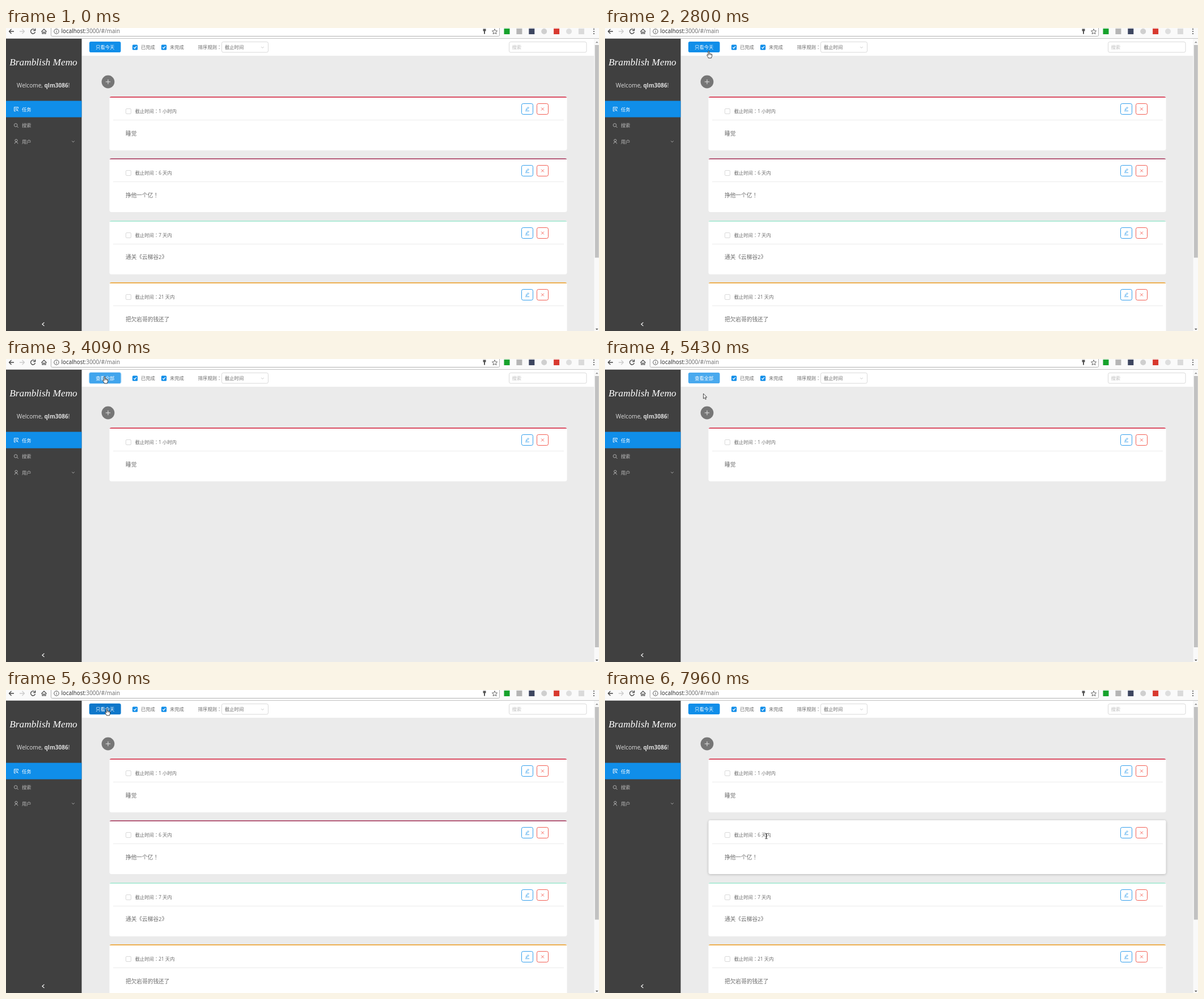
An HTML page with a canvas that plays this animation: 1046 px wide and 535 px high, repeating every 8000 ms.

```html
<!DOCTYPE html>
<html lang="zh-CN">
<head>
<meta charset="utf-8">
<title>Todo</title>
<style>
html, body { margin: 0; width: 100%; height: 100%; overflow: hidden; background: #ebebeb; }
canvas { display: block; width: 1046px; height: 535px; }
</style>
</head>
<body>
<canvas id="stage" width="1046" height="535"></canvas>
<script>
const ctx = document.getElementById('stage').getContext('2d');
const LOOP = 8000, TICK = 90, TAU = Math.PI * 2;
const FONT = '"Open Sans", "Noto Sans CJK SC", "Noto Sans CJK", sans-serif';
const MARKS = '"Noto Sans CJK TC", "Noto Sans CJK SC", sans-serif';
const BLUE = '#108ee9', RED = '#f04134', LINE = '#d9d9d9', INK = '#6a6a6a';
const FIRST = 121.5, PITCH = 109.4, HEIGHT = 95;

// The two clicks: the first shows only today, the second shows everything
const CLICKS = [{ down: 3720, up: 3960 }, { down: 6100, up: 6390 }];
const BLUR = 6750;

// Turning points of the pointer
const PATH = [
  { t: 0, x: 700, y: 600 },
  { t: 560, x: 440, y: 200 },
  { t: 980, x: 335, y: 115 },
  { t: 1500, x: 200, y: 48 },
  { t: 1780, x: 168, y: 72 },
  { t: 2790, x: 183, y: 41 },
  { t: 3080, x: 222, y: 138 },
  { t: 3420, x: 205, y: 138 },
  { t: 3680, x: 174, y: 31 },
  { t: 4320, x: 174, y: 31 },
  { t: 4920, x: 173, y: 55 },
  { t: 5400, x: 173.5, y: 61 },
  { t: 5640, x: 181, y: 93 },
  { t: 5840, x: 178, y: 33 },
  { t: 6390, x: 178, y: 33 },
  { t: 6640, x: 220, y: 133 },
  { t: 7240, x: 304, y: 142 },
  { t: 7500, x: 252, y: 244 },
  { t: 7900, x: 284.5, y: 258 }
];

const CARDS = [
  { due: '1 小时内', text: '睡觉', rgb: [217, 77, 99] },
  { due: '6 天内', text: '挣他一个亿！', rgb: [181, 93, 122] },
  { due: '7 天内', text: '通关《云梯谷2》', rgb: [176, 234, 214] },
  { due: '21 天内', text: '把欠岩哥的钱还了', rgb: [237, 176, 82] }
];

function pointerAt(t) {
  const k = PATH.findIndex(p => p.t > t);
  if (k < 1) return k ? PATH[PATH.length - 1] : PATH[0];
  const a = PATH[k - 1], b = PATH[k], f = Math.max(0, (t - a.t) / (b.t - a.t));
  return { x: a.x + (b.x - a.x) * f, y: a.y + (b.y - a.y) * f };
}

// Delayed transition: share of a 300 ms window in which test held
function fade(test, t) {
  const n = 15;
  let sum = 0;
  for (let k = 0; k < n; k++) sum += test(t - 450 + 300 * (k + .5) / n) ? 1 : 0;
  return sum / n;
}

const overPlus = p => Math.hypot(p.x - 180, p.y - 95) < 11.5;
const overButton = p => p.x > 147 && p.x < 202.5 && p.y > 24 && p.y < 43.5;
const overCard = (p, i) => p.x > 182 && p.x < 990 &&
  p.y > FIRST + i * PITCH && p.y < FIRST + i * PITCH + HEIGHT;
const overText = p => p.x > 228 && p.x < 293 &&
  CARDS.some((c, i) => Math.abs(p.y - FIRST - 25.2 - i * PITCH) < 5);

const mix = (a, b, k) => `rgb(${a.map((v, i) => Math.round(v + (b[i] - v) * k))})`;

function rect(x, y, w, h, color) {
  ctx.fillStyle = color;
  ctx.fillRect(x, y, w, h);
}

function paint(fill, stroke, width) {
  if (fill) { ctx.fillStyle = fill; ctx.fill(); }
  if (stroke) { ctx.strokeStyle = stroke; ctx.lineWidth = width; ctx.stroke(); }
}

function box(x, y, w, h, r, fill, stroke, width = 1) {
  ctx.beginPath();
  ctx.roundRect(x, y, w, h, r);
  paint(fill, stroke, width);
}

function disc(x, y, r, fill, stroke, width = 1) {
  ctx.beginPath();
  ctx.arc(x, y, r, 0, TAU);
  paint(fill, stroke, width);
}

// SVG-style path placed at x, y
function shape(d, x, y, stroke, width = 1, fill) {
  const p = new Path2D(d);
  ctx.save();
  ctx.translate(x, y);
  ctx.lineJoin = 'round';
  if (fill) { ctx.fillStyle = fill; ctx.fill(p); }
  if (stroke) { ctx.strokeStyle = stroke; ctx.lineWidth = width; ctx.stroke(p); }
  ctx.restore();
}

// Text centred vertically on cy, wide punctuation centred in its cell; returns the right edge
function label(s, x, cy, size, color, style = '', family = FONT) {
  ctx.fillStyle = color;
  for (const part of s.split(/([：！])/)) {
    ctx.font = `${style} ${size}px ${/[：！]/.test(part) ? MARKS : family}`;
    ctx.fillText(part, x, cy + size * .37);
    x += ctx.measureText(part).width;
  }
  return x;
}

const chevron = (x, y, color) => shape('M-2.2-1.1L0 1.1L2.2-1.1', x, y, color, .9);

function browserBar() {
  rect(0, 0, 1046, 19, '#fafafa');
  box(79.5, -6, 791, 20.5, 2, '#fff', '#b4b4b4');
  rect(0, 18, 1046, 1, '#c4c4c4');
  shape('M4.5 0H-4M0-4L-4 0L0 4', 9.5, 6, '#444', 1.3);
  shape('M-4.5 0H4M0-4L4 0L0 4', 28.5, 6, '#ccc', 1.3);
  shape('M3.2-2.6A4 4 0 1 0 4 1M4.2-5V-1.4H.6', 47.5, 6, '#444', 1.3);
  shape('M-4.5.5L0-4L4.5.5M-3 0V4H-1V1H1V4H3V0', 67, 6, '#444', 1.1);
  disc(89, 6, 4.2, null, '#555');
  shape('M0-.7V2.3M0-2.6V-1.6', 89, 6, '#555');
  const x = label('localhost', 97.5, 5.8, 9.9, '#222');
  label(':3000/#/main', x, 5.8, 9.9, '#666');
  shape('M-2.5-4H2.5V0H1V5H-1V0H-2.5Z', 844, 5.5, null, 1, '#555');
  shape('M0-4.6L1.3-1.5L4.6-1.2L2.1 1L2.9 4.3L0 2.5L-2.9 4.3L-2.1 1L-4.6-1.2L-1.3-1.5Z', 862, 6.3, '#555', .9);
  ['#16a22c', '#b5b5b5', '#3d4660', '#cfcfcf', '#d8392f', '#dedede', '#dadada']
    .forEach((c, i) => box(878.5 + i * 21.9, 1, 10, 10, i % 2 && i > 2 ? 5 : 0, c));
  for (const y of [2, 6, 10]) disc(1037, y, 1.1, '#555');
}

function sidebar() {
  const dim = '#bcbcbc', pale = '#dcdcdc';
  rect(0, 19, 133.5, 516, '#404040');
  ctx.textAlign = 'center';
  label('Bramblish Memo', 66, 60, 17.3, '#fff', 'italic', '"Liberation Serif", serif');
  ctx.textAlign = 'left';
  let x = label('Welcome, ', 19, 101.5, 10.1, pale);
  x = label('qlm3086', x, 101.5, 10.1, pale, 'bold');
  label('!', x, 101.5, 10.1, pale);
  rect(0, 128.6, 133.5, 29, BLUE);
  shape('M3.5-1V-3.5H-3.5V3.5H-1M-2-1.3H2M-2 .8H0M1 1L3.8 3.8M1 3V1H3', 18, 143.3, '#fff', .9);
  disc(17.2, 171.5, 2.8, null, dim, .9);
  shape('M0 0L2.3 2.3', 19.3, 173.6, dim);
  disc(18, 198.6, 2.1, null, dim, .9);
  shape('M-2.8 4C-2.8.2 2.8.2 2.8 4', 18, 200.4, dim, .9);
  ['任务', '搜索', '用户'].forEach((s, i) => label(s, 28, 143.5 + i * 28.8, 8.3, i ? dim : '#fff'));
  chevron(118.5, 200.5, dim);
  shape('M2-3.2L-1.6 0L2 3.2', 65.5, 523, '#fff', 1.1);
}

function checked(x, text) {
  box(x, 29.5, 9.2, 9.2, 1.5, BLUE);
  shape('M-2.4 0L-.6 1.9L2.6-2', x + 4.6, 34.1, '#fff', 1.2);
  label(text, x + 15, 34, 8.3, INK);
}

function buttonColor(t) {
  const normal = [16, 142, 233];
  if (CLICKS.some(c => t >= c.down && t <= c.up)) return mix(normal, [14, 119, 202], 1);
  const lit = s => overButton(pointerAt(s)) || (s > CLICKS[0].up && s < BLUR);
  return mix(normal, [73, 169, 238], fade(lit, t));
}

function tools(t, onlyToday) {
  rect(133.5, 19, 904, 30, '#fff');
  for (const { up } of CLICKS) {
    const k = (t - up) / 200, s = .6 + k * 1.6;
    if (k >= 0 && k < 1) box(147 - s, 24 - s, 55.5 + 2 * s, 19 + 2 * s, 3 + s, `rgba(16,142,233,${.4 * (1 - k)})`);
  }
  box(147, 24, 55.5, 19, 2.8, buttonColor(t));
  label(onlyToday ? '查看全部' : '只看今天', 158.2, 33.7, 8.3, '#fff');
  checked(223, '已完成');
  checked(274, '未完成');
  label('排序规则：', 338.8, 34, 8.3, INK);
  box(380.5, 24.5, 82, 18.5, 2.8, '#fff', LINE);
  label('截止时间', 386, 34, 8.3, INK);
  chevron(452.5, 34.3, '#c0c0c0');
  box(887.5, 24.5, 136.5, 18.5, 2.8, '#fff', LINE);
  label('搜索', 892.5, 34.2, 8.3, '#bdbdbd');
}

function action(x, y, color, icon) {
  box(x, y, 20, 19, 2.8, '#fff', color, .85);
  shape(icon, x + 10, y + 9.5, color, .75);
}

function card(c, i, t) {
  const y = FIRST + i * PITCH, top = Math.floor(y);
  const h = fade(s => overCard(pointerAt(s), i), t);
  ctx.save();
  ctx.shadowColor = `rgba(0,0,0,${.24 * h})`;
  ctx.shadowBlur = 4;
  ctx.shadowOffsetY = .7;
  box(182.5, top, 807, HEIGHT, 3.5, '#fff');
  ctx.restore();
  ctx.save();
  ctx.clip();
  rect(182, top, 808, 2, mix(c.rgb, [255, 255, 255], h));
  ctx.restore();
  box(211.5, top + 21.5, 9, 9, 1.5, '#fff', LINE);
  label('截止时间：' + c.due, 227.7, y + 25.2, 8.3, INK);
  rect(189, Math.round(y + 40.4), 795, 1, '#ebebeb');
  label(c.text, 211, y + 64.5, 9.7, INK);
  const by = Math.floor(y + 12) + .5;
  action(909.5, by, BLUE, 'M-2.2 1.6L-1.7-.3L1.6-3.4L2.9-2.1L-.4 1.1ZM-3.6 3.4H3.6');
  action(936.5, by, RED, 'M-2.5-2.5L2.5 2.5M2.5-2.5L-2.5 2.5');
}

function scrollbar(bottom) {
  rect(1037.5, 19, 8.5, 516, '#f9f9f9');
  rect(1038.8, 30, 6.9, bottom - 30, '#c1c1c1');
  shape('M-2.4 1.3L0-1.3L2.4 1.3Z', 1042.3, 25, null, 1, '#8a8a8a');
  shape('M-2.4-1.3L0 1.3L2.4-1.3Z', 1042.3, 532, null, 1, '#505050');
}

function pointer(p) {
  const { x, y } = p;
  if (overButton(p) || overPlus(p)) {
    shape('M-1.1.7C-1.1-.5.8-.5.8.7V4.2C1.4 3.6 2.4 3.8 2.6 4.6C3.2 4.1 4.2 4.3 4.3 5.1' +
      'C5 4.7 5.7 5.1 5.7 6V8.4C5.7 9.6 4.6 10.2 4.6 12H-.6C-.8 10.4-2.6 8.8-3.2 7.2' +
      'C-3.5 6.2-2.3 5.6-1.6 6.6L-1.1 7.3Z', x, y, '#111', .8, '#fff');
    shape('M.8 4.2V6.6M2.6 4.7V6.8M4.3 5.2V7', x, y, '#111', .6);
  } else if (overText(p)) {
    shape('M-2-4.5H-.6L0-4L.6-4.5H2M0-4V4M-2 4.5H-.6L0 4L.6 4.5H2', x, y, '#222');
  } else {
    shape('M0 0V9L2.1 7.1L3.5 10.3L5 9.6L3.6 6.5H6.2Z', x, y, '#222', .8, '#fff');
  }
}

function draw(now) {
  const t = Math.floor(now % LOOP / TICK) * TICK;
  const onlyToday = t >= CLICKS[0].up && t < CLICKS[1].up;
  const p = pointerAt(t);
  rect(0, 0, 1046, 535, '#ebebeb');
  CARDS.forEach((c, i) => { if (!i || !onlyToday) card(c, i, t); });
  disc(180, 95, 11.4, overPlus(p) ? '#858585' : '#767676');
  shape('M-4.2 0H4.2M0-4.2V4.2', 180, 95, '#e4e4e4');
  tools(t, onlyToday);
  sidebar();
  scrollbar(onlyToday ? 509 : 405.5);
  browserBar();
  pointer(p);
}

const begin = performance.now();
function tick() {
  draw(performance.now() - begin);
  requestAnimationFrame(tick);
}
tick();
</script>
</body>
</html>
```
